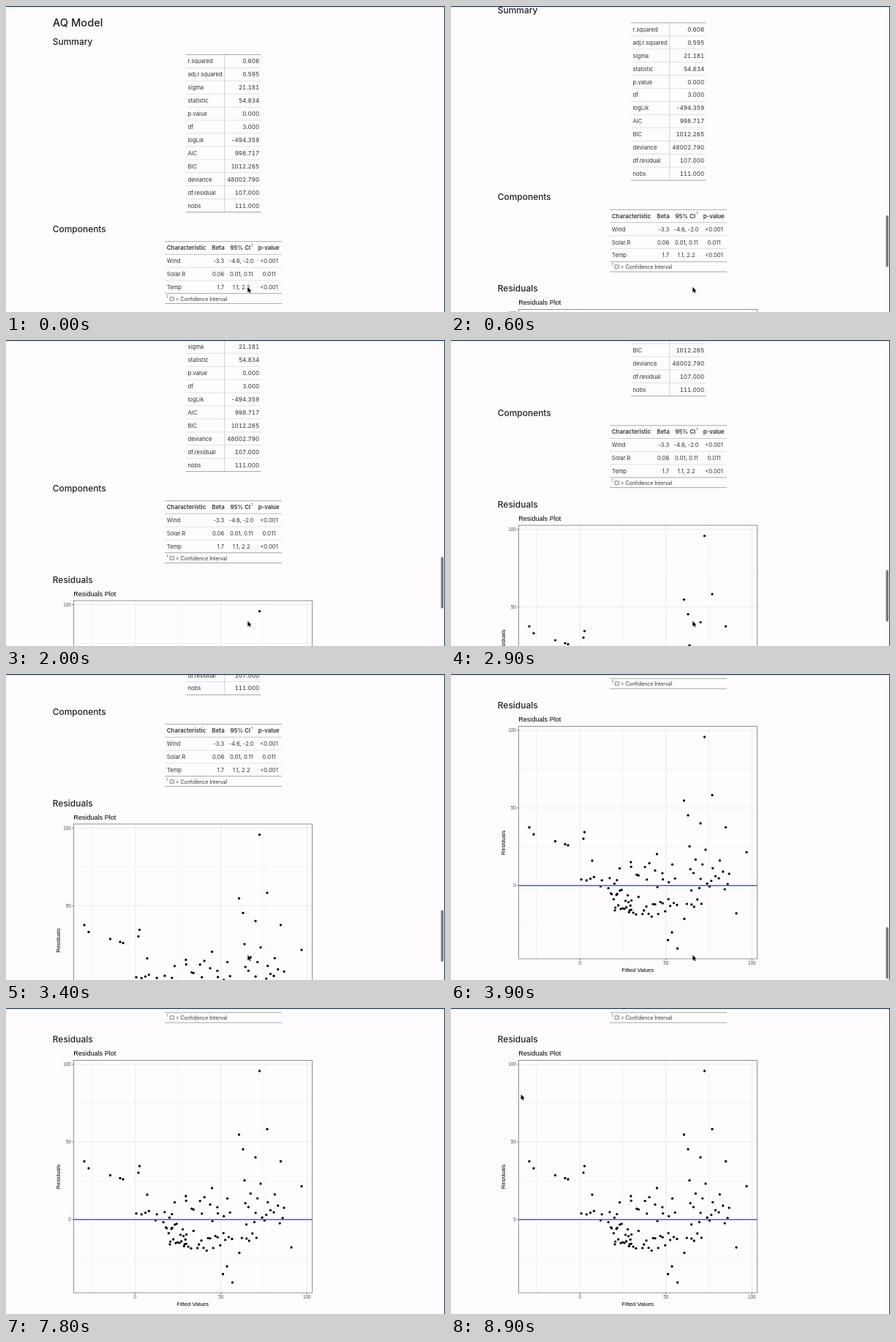
An HTML page for the animation above (9.8 s loop, 600 by 418 pixels).

```html
<!DOCTYPE html>
<html lang="en">
<head>
<meta charset="utf-8">
<title>AQ Model</title>
<style>
  html, body { margin: 0; height: 100%; overflow: hidden; background: #fefcfe; }
  svg { display: block; width: 100%; height: 100%; }
  text { font: 7.7px Inter, sans-serif; fill: #333; }
  .h1 { font-size: 14.7px; font-weight: 500; fill: #222; }
  .h2 { font-size: 11.95px; font-weight: 500; fill: #222; }
  .num { font-size: 8.1px; font-variant-numeric: tabular-nums; }
  .th { font-size: 7.85px; font-weight: 600; }
  .note { font-size: 6.9px; }
  .mark { font-size: 4.8px; font-style: italic; }
  .title, .axis, .tick { font-family: "Liberation Sans", Arial, sans-serif; fill: #000; }
  .title { font-size: 9.1px; }
  .axis { font-size: 7.6px; }
  .tick { font-size: 6.4px; fill: #4d4d4d; }
  .end { text-anchor: end; }
  .mid { text-anchor: middle; }
</style>
</head>
<body>
<svg viewBox="0 0 600 418">
  <g id="page"></g>
  <rect id="thumb" x="594.4" width="3.6" height="70.5" rx="1.8" fill="#7d7d7f"/>
  <path d="M0 0H600V418H599V1.2H0Z" fill="#22384a"/>
  <path id="cursor" d="M0 0V7.2L1.7 5.7L2.8 8.3L4 7.8L2.9 5.2H5.2Z"
        fill="#000" stroke="#fff" stroke-width=".7" paint-order="stroke"/>
</svg>
<script>
const LOOP = 9800, STEP = 100, PLOT_Y = 386.5;
const byId = id => document.getElementById(id);
const text = (x, y, cls, s, extra = '') => `<text x="${x}" y="${y}" class="${cls}" ${extra}>${s}</text>`;
const line = (x1, y1, x2, y2, color, width) =>
  `<path d="M${x1} ${y1}L${x2} ${y2}" stroke="${color}" stroke-width="${width}"/>`;

function summaryTable() {
  const rows = ['r.squared 0.606', 'adj.r.squared 0.595', 'sigma 21.181', 'statistic 54.834',
    'p.value 0.000', 'df 3.000', 'logLik -494.359', 'AIC 998.717', 'BIC 1012.265',
    'deviance 48002.790', 'df.residual 107.000', 'nobs 111.000'];
  const top = 66.4, pitch = 17.93, bottom = top + pitch * rows.length;
  return rows.map((row, i) => {
    const y = top + pitch * i, [name, value] = row.split(' ');
    return (i ? line(246, y, 348.3, y, '#d6d6d6', .7) : '') +
      text(248.5, y + 11.9, '', name) + text(346.3, y + 11.9, 'num end', value);
  }).join('') +
    line(298.8, top, 298.8, bottom, '#d0d0d0', 1) +
    line(246, top, 348.3, top, '#a8a8a8', 1) + line(246, bottom, 348.3, bottom, '#a8a8a8', 1);
}

function componentTable() {
  const rows = [['Wind', '-3.3', '-4.6, -2.0', '&lt;0.001'],
    ['Solar.R', '0.06', '0.01, 0.11', '0.011'], ['Temp', '1.7', '1.1, 2.2', '&lt;0.001']];
  const rule = (y, color, width) => line(217, y, 377, y, color, width);
  return rule(321.7, '#a8a8a8', 1) + rule(339.3, '#c4c4c4', 1) + rule(357.2, '#d6d6d6', .7) +
    rule(375, '#d6d6d6', .7) + rule(392.7, '#a8a8a8', 1) + rule(406.5, '#a8a8a8', 1) +
    text(219.8, 333.4, 'th', 'Characteristic') + text(298.7, 333.4, 'th end', 'Beta') +
    text(306.5, 333.4, 'th', '95% CI') + text(335, 328.8, 'mark', '1') +
    text(359.2, 333.4, 'th mid', 'p-value') +
    rows.map(([name, beta, ci, p], i) => {
      const y = 351.2 + 17.85 * i;
      return text(219.8, y, '', name) + text(298.2, y, 'end', beta) +
        text(321.7, y, 'mid', ci) + text(359.5, y, 'mid', p);
    }).join('') +
    text(219.4, 398.8, 'mark', '1') + text(223.2, 402.6, 'note', 'CI = Confidence Interval');
}

function seededRandom(seed) {
  return () => (seed = (seed * 16807) % 2147483647) / 2147483647;
}

// A few outliers by position; the rest are seeded clouds around the zero line.
function residualPoints() {
  const points = [[107, 209.5], [113, 219], [142.5, 228.5], [156, 232.5], [160, 234], [181, 225],
    [182.5, 216], [193, 255], [230.5, 265.5], [281.5, 246], [318.5, 173], [324, 193], [341, 204],
    [346.5, 86], [357, 165.5], [375.5, 209.5], [404, 243.5], [326, 235.5], [348, 240],
    [390, 327], [309.5, 375], [296.5, 363.5], [302, 353]];
  const random = seededRandom(2024);
  const cloud = (count, x1, x2, y1, y2) => {
    for (let i = 0; i < count; i++) {
      points.push([x1 + (x2 - x1) * (i + random()) / count, y1 + (y2 - y1) * random()]);
    }
  };
  cloud(10, 178, 232, 277, 293);
  cloud(14, 241, 309, 256, 292);
  cloud(18, 324, 383, 253, 299);
  cloud(20, 218, 248, 294, 323);
  cloud(20, 242, 309, 303, 336);
  cloud(6, 317, 343, 297, 335);
  return points.map(([x, y]) => `<circle cx="${x}" cy="${y}" r="1.65"/>`).join('');
}

function residualPlot() {
  const left = 92.5, right = 418.5, top = 71.5, bottom = 389;
  const px = v => 176.3 + v * 2.35, py = v => 289 - v * 2.12;
  const gridX = (v, w) => line(px(v), top, px(v), bottom, '#e6e6e6', w);
  const gridY = (v, w) => line(left, py(v), right, py(v), '#e6e6e6', w);
  let out = '';
  for (const v of [-25, 25, 75]) out += gridX(v, .4) + gridY(v, .4);
  for (const v of [0, 50, 100]) {
    out += gridX(v, .8) + gridY(v, .8) +
      line(px(v), bottom, px(v), bottom + 2.2, '#333', .7) + line(left - 2.2, py(v), left, py(v), '#333', .7) +
      text(px(v), 397.3, 'tick mid', v) + text(88.8, py(v) + 2.3, 'tick end', v);
  }
  return out + residualPoints() + line(left, 289, right, 289, '#3f63d3', 1.3) +
    `<rect x="${left}" y="${top}" width="${right - left}" height="${bottom - top}" fill="none" stroke="#777" stroke-width=".8"/>` +
    text(92.2, 65.4, 'title', 'Residuals Plot') + text(255.2, 406.8, 'axis mid', 'Fitted Values') +
    text(0, 0, 'axis mid', 'Residuals', 'transform="translate(74 230.5) rotate(-90)"');
}

byId('page').innerHTML =
  text(63.8, 28.4, 'h1', 'AQ Model') + text(63.8, 53.1, 'h2', 'Summary') + summaryTable() +
  text(63.8, 308.7, 'h2', 'Components') + componentTable() +
  text(63.8, 433.8, 'h2', 'Residuals') +
  `<g transform="translate(0 ${PLOT_Y})">${residualPlot()}</g>`;

const clamp = v => Math.max(0, Math.min(1, v));
const smooth = p => p * p * (3 - 2 * p);
const progress = (t, from, to) => clamp((t - from) / (to - from));

// Each swipe: start, end, distance.
const swipes = [[0, 900, 52.4], [1300, 2000, 49.6], [2500, 3100, 124], [3300, 3900, 160.5]];
const scrollAt = t => swipes.reduce((sum, [from, to, distance]) =>
  sum + distance * smooth(progress(t, from, to) ** .75), 0);

function cursorAt(t) {
  if (t < 5800) {
    const p = smooth(progress(t, 5000, 5600));
    return [330.3 - 107 * p, 384 - 76.5 * p];
  }
  if (t < 8100) return null;
  if (t < 8200) return [74.5, 41.5];
  const p = smooth(progress(t, 8600, 8900));
  return [78.5 + 17.1 * p, 45.5 + 72.5 * p];
}

function draw(now) {
  const t = Math.floor(now % LOOP / STEP) * STEP;
  const scroll = scrollAt(t), cursor = cursorAt(t);
  byId('page').setAttribute('transform', `translate(0 ${-scroll})`);
  byId('thumb').setAttribute('y', 278.4 + scroll * .1745);
  byId('thumb').setAttribute('opacity', t < STEP ? 0 : clamp((4500 - t) / 300));
  byId('cursor').setAttribute('visibility', cursor ? 'visible' : 'hidden');
  if (cursor) byId('cursor').setAttribute('transform', `translate(${cursor})`);
}

const start = performance.now();
function tick() {
  draw(performance.now() - start);
  requestAnimationFrame(tick);
}
tick();
</script>
</body>
</html>
```
